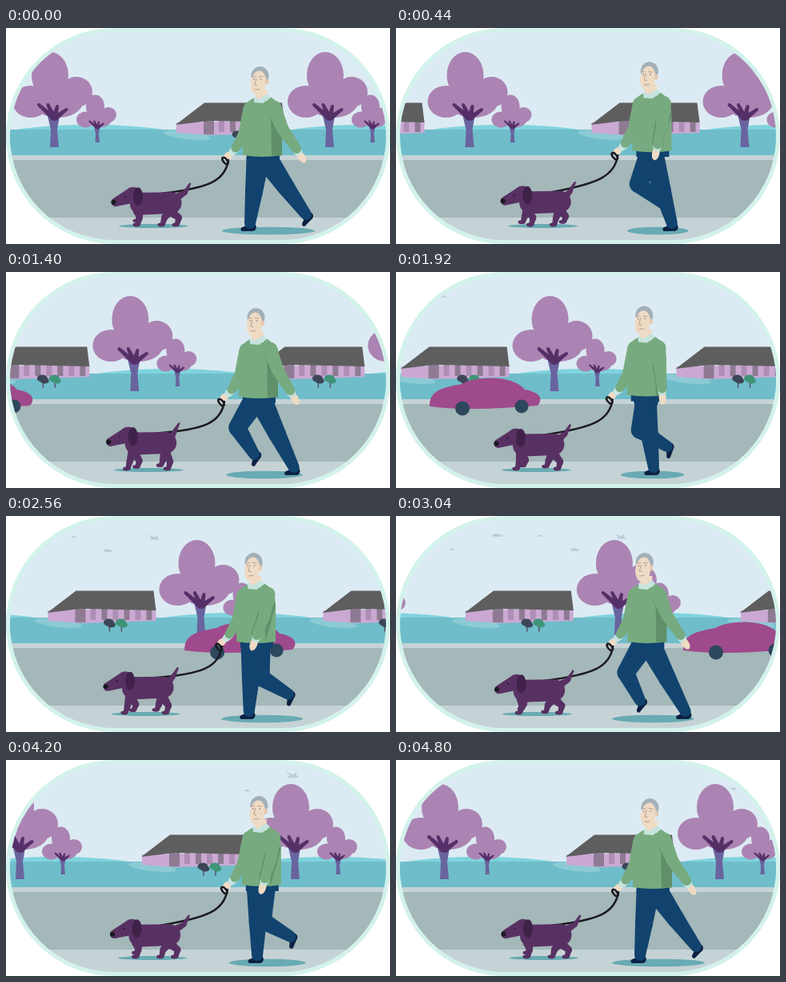
Animation of 480 by 270 pixels, one loop 4.84 s. Source, as an HTML page with a canvas:

```html
<!DOCTYPE html>
<html lang="en">
<head>
<meta charset="utf-8">
<title>Walking the dog</title>
<style>
html, body { margin: 0; width: 100%; height: 100%; overflow: hidden; background: #fff; }
canvas { display: block; width: 480px; height: 270px; }
</style>
</head>
<body>
<canvas id="stage" width="480" height="270"></canvas>
<script>
const g = document.getElementById('stage').getContext('2d');
const LOOP = 4840, CYCLE = 4800, STEP = 40, TILE = 344;
const TAU = Math.PI * 2;
const wave = turns => Math.cos(TAU * turns);
const frac = x => x - Math.floor(x);

const C = {
  sky: '#dcebf3', hill: '#7fd3dd', field: '#6fbdca', path: '#8ccbd5',
  kerb: '#c6d3d6', road: '#a4b7b9', ring: '#d3f2ec', shade: '#69aab3',
  crown: '#ab84b3', branch: '#553068', trunk: '#69649f',
  roof: '#5f5e5f', wall: '#cba9d3', pane: '#8e7b93',
  car: '#9f4a8c', wheel: '#2d475d', bird: '#bccdd6',
  dog: '#583163', ear: '#40214a', ink: '#1b1a20',
  skin: '#efdac4', hair: '#a3b0b7', shirt: '#c5e4df',
  knit: '#77ab7f', fold: '#5f9069', jeans: '#11436e', shoe: '#0c2043'
};

function poly(color, ...pts) {
  g.fillStyle = color;
  g.beginPath();
  pts.forEach(p => g.lineTo(...p));
  g.fill();
}

function oval(color, x, y, rx, ry = rx, turn = 0) {
  g.fillStyle = color;
  g.beginPath();
  g.ellipse(x, y, rx, ry, turn, 0, TAU);
  g.fill();
}

function box(color, x, y, w, h) {
  g.fillStyle = color;
  g.fillRect(x, y, w, h);
}

// Chain of tapered segments; each joint is [x, y, radius].
function limb(color, ...joints) {
  joints.forEach(([x, y, r], i) => {
    oval(color, x, y, r);
    if (!i) return;
    const [px, py, pr] = joints[i - 1];
    const a = Math.atan2(y - py, x - px), s = Math.sin(a), c = Math.cos(a);
    poly(color, [px - s * pr, py + c * pr], [x - s * r, y + c * r],
      [x + s * r, y - c * r], [px + s * pr, py - c * pr]);
  });
}

function line(color, width, draw) {
  g.strokeStyle = color;
  g.lineWidth = width;
  g.lineCap = g.lineJoin = 'round';
  g.beginPath();
  draw();
  g.stroke();
}

function at(x, y, draw, scale = 1, turn = 0) {
  g.save();
  g.translate(x, y);
  g.scale(scale, scale);
  g.rotate(turn);
  draw();
  g.restore();
}

/* Scenery */
function tree(x, y, scale) {
  at(x, y, () => {
    oval(C.crown, -5, -90, 23, 29);
    oval(C.crown, -29, -57, 23, 20);
    oval(C.crown, 28, -69, 20, 19);
    oval(C.crown, 5, -57, 31, 20);
    poly(C.trunk, [-5, 0], [-4, -22], [-8, -39], [7, -39], [4, -22], [6, 0]);
    for (let i = 0; i < 4; i++) {
      limb(C.branch, [i - 1, -37, 3.5], [-19 + i * 11.5, -53 + i * (i - 1), 2]);
    }
  }, scale);
}

function bush(color, x) {
  line('#5d4c63', 1.5, () => { g.moveTo(x, 144); g.lineTo(x, 135); });
  oval(color, x - 1, 133, 6.5, 4.5);
  oval(color, x + 2, 136, 5.5, 3.5);
}

function house(x) {
  at(x, 0, () => {
    oval(C.path, 16, 134, 30, 5, .12);
    poly(C.wall, [3, 118], [138, 116], [138, 131], [44, 134], [3, 131]);
    box(C.pane, 37, 116, 13, 17);
    for (let i = 0; i < 6; i++) box(i % 2 ? C.pane : '#ad8fb6', 56 + i * 14, 116, 7, 14);
    poly(C.roof, [2, 121], [38, 93.5], [135, 93.5], [138, 118], [44, 116]);
    bush('#3d4658', 80);
    bush('#3f9477', 95);
  });
}

function scenery(scroll) {
  box(C.sky, 0, 0, 480, 130);
  const tiles = draw => {
    for (let k = -1; k < 2; k++) at(k * TILE + scroll, 0, draw);
  };
  tiles(() => oval(C.hill, 105, 140, 125, 19));
  box(C.field, 0, 127, 480, 33);
  tiles(() => {
    house(210);
    tree(60, 149, 1);
    tree(114, 143, .5);
  });
  box(C.kerb, 0, 159, 480, 111);
  box(C.road, 0, 165, 480, 72);
}

function birds(t) {
  const flock = [[84, 26, 4], [126, 43, 7], [184, 28, 7], [-27, 43, 4], [29, 25, 8]];
  flock.forEach(([x, y, r], i) => {
    const s = t - 2560, flap = .3 + .3 * wave(t / 480 + i * .3);
    at(x + s * .2, y - s * .003, () => {
      poly(C.bird, [-.3, -.1], [-1, -flap - .1], [.2, -.2], [.7, -flap],
        [.8, 0], [1.2, .2], [.2, .3], [-.7, .2]);
    }, r);
  });
}

function car(t) {
  at(42 + (t - 1920) * .283, 0, () => {
    g.fillStyle = C.car;
    g.beginPath();
    g.moveTo(0, 168);
    g.bezierCurveTo(0, 148, 14, 145, 40, 140);
    g.bezierCurveTo(60, 129, 105, 129, 119, 147);
    g.bezierCurveTo(137, 150, 143, 158, 135, 167);
    g.bezierCurveTo(90, 170, 50, 174, 0, 168);
    g.fill();
    oval(C.wheel, 41, 170.5, 9);
    oval(C.wheel, 115, 168, 8.5);
  });
}

/* Dog */
const dogBob = t => 3 * wave(t / 600 + .08);

function dog(t, sway) {
  const phase = t / 1200, dy = dogBob(t);
  at(sway, 0, () => {
    oval(C.shade, 179.5, 247.5, 43.5, 2.6);
    const leg = (x, u, reach) => {
      const px = x + reach * wave(u), lift = Math.max(0, wave(u + .25)) * 5;
      limb(C.dog, [x, 226 + dy, 6], [px + 2, 237 - lift / 2, 4], [px, 245 - lift, 3]);
      oval(C.dog, px - 2, 246 - lift, 4.5, 2.4);
    };
    [0, .5].forEach(u => {
      leg(160, phase + u - .25, 7);
      leg(200, phase + u, 9);
    });
    at(0, dy, () => {
      const tip = 220 + 5 * wave(t / 600);
      limb(C.dog, [207, 210, 5], [tip - 6, 203, 3], [tip, 192, 1.2]);
      limb(C.dog, [164, 217, 14], [201, 216, 13.5]);
      limb(C.dog, [132, 215, 5.5], [154, 206, 10]);
      oval(C.ear, 160, 208, 6, 11.5);
      oval(C.ink, 129.5, 215, 3);
      oval(C.ink, 143.5, 208, 1);
    });
  });
}

function leash(mx, my, dx, dy) {
  line(C.ink, 2.5, () => {
    g.ellipse(mx + 270, my + 163, 5, 2.4, .9, 0, TAU);
    g.moveTo(mx + 274, my + 162);
    g.bezierCurveTo(mx + 270, my + 188, mx + 250, my + 197, dx + 190, dy + 204);
  });
}

/* Man */

// Heel strike at u = 0, toe off near u = 0.5.
function foot(u) {
  const drag = u > .5 && u < .75 ? Math.sin(2 * TAU * (u - .5)) : 0;
  const swing = u > .42 ? Math.sin(Math.PI * (u - .42) / .58) : 0;
  return [336 - 35 * wave(u) - 8 * drag, 246 - 26 * swing, 1.2 * Math.sqrt(swing)];
}

// Knee bends towards the walking direction.
function knee(hx, hy, ax, ay) {
  const dx = ax - hx, dy = ay - hy, d = Math.hypot(dx, dy);
  const out = Math.sqrt(Math.max(0, 41 ** 2 - d * d / 4));
  return [(hx + ax) / 2 - dy / d * out, (hy + ay) / 2 + dx / d * out];
}

function leg(turns, hy) {
  const u = frac(turns), hx = 316 - 5 * wave(u);
  const [ax, ay, pitch] = foot(u);
  at(ax, ay, () => limb(C.shoe, [3, 3, 4.8], [-9, 5.5, 2.5]), 1, -pitch);
  limb(C.jeans, [hx, hy, 14.5], [...knee(hx, hy, ax, ay), 11], [ax, ay - 2, 7]);
}

function head() {
  box(C.skin, 308, 74, 15, 14);
  oval(C.hair, 313.5, 57, 11, 12);
  oval(C.skin, 311.5, 66, 9.5, 15.5, .12);
  oval('#e6c6b2', 322, 64, 2, 3.5);
  line('#a68f86', .8, () => {
    g.moveTo(304, 58); g.lineTo(308, 57.5);
    g.moveTo(312, 57.5); g.lineTo(317, 58);
    g.moveTo(309, 60); g.lineTo(307, 68); g.lineTo(310, 68.5);
    g.moveTo(307, 74); g.lineTo(313, 73.5);
  });
  oval('#6a747b', 306, 61, .8);
  oval('#6a747b', 314.5, 61, .8);
  poly(C.shirt, [306, 82], [312, 86], [323, 79], [327, 84], [317, 91], [306, 90]);
}

function torso() {
  g.fillStyle = C.knit;
  g.beginPath();
  g.moveTo(307, 84);
  g.quadraticCurveTo(294, 89, 293, 102);
  g.lineTo(292, 156);
  g.quadraticCurveTo(317, 160, 341, 156);
  g.lineTo(341, 112);
  g.quadraticCurveTo(341, 90, 326, 83);
  g.quadraticCurveTo(316, 93, 307, 84);
  g.fill();
}

function freeArm(u) {
  const s = wave(u + .04), ex = 333 + 9 * s, ey = 123, wx = 334 + 26 * s, wy = 149;
  const a = Math.atan2(wy - ey, wx - ex), hem = Math.min(341, Math.max(328, wx - 2));
  poly(C.fold, [327, 98], [328, 156.5], [hem, 156.5], [341, 110]);
  limb(C.fold, [330, 104, 6], [ex - 3, ey, 6], [wx - 2, wy - 3, 5]);
  at(wx, wy, () => {
    oval(C.skin, 11, 0, 8.5, 4.6);
    limb(C.shirt, [0, 0, 5.5], [3, 0, 5.2]);
  }, 1, a);
  limb(C.knit, [331, 97, 9.5], [ex, ey, 7.5], [wx, wy - 1, 6]);
}

function man(t, sway, bob) {
  const u = t / 1600;
  at(sway, 0, () => {
    oval(C.shade, 324, 253.5, 48 + 10 * wave(t / 800), 4.8);
    leg(u + .5, 160 + bob);
    leg(u, 160 + bob);
    at(0, bob, () => {
      box(C.jeans, 297, 150, 41, 14);
      oval(C.skin, 273.5, 157, 6, 4.5, -.7);
      limb(C.shirt, [283, 148, 5], [279, 152, 4.5]);
      limb(C.knit, [302, 98, 9.5], [295, 129, 8.5], [283, 147, 5.5]);
      torso();
      head();
      freeArm(u);
    });
  });
}

function pill(color, inset) {
  const h = 270 - 2 * inset;
  g.fillStyle = color;
  g.beginPath();
  g.roundRect(inset, inset, 480 - 2 * inset, h, h / 2);
  g.fill();
}

function draw(t) {
  const swing = wave(t / CYCLE), mx = 4 * swing, dx = 5 * swing;
  const bob = 3 * wave(t / 800);
  g.clearRect(0, 0, 480, 270);
  pill(C.ring, 0);
  g.save();
  pill(C.sky, 5);
  g.clip();
  scenery(TILE * t / CYCLE);
  birds(t);
  car(t);
  man(t, mx, bob);
  leash(mx, bob, dx, dogBob(t));
  dog(t, dx);
  g.restore();
}

let start;
function tick(now) {
  start ??= now;
  draw(Math.floor((now - start) % LOOP / STEP) * STEP);
  requestAnimationFrame(tick);
}
requestAnimationFrame(tick);
</script>
</body>
</html>
```
